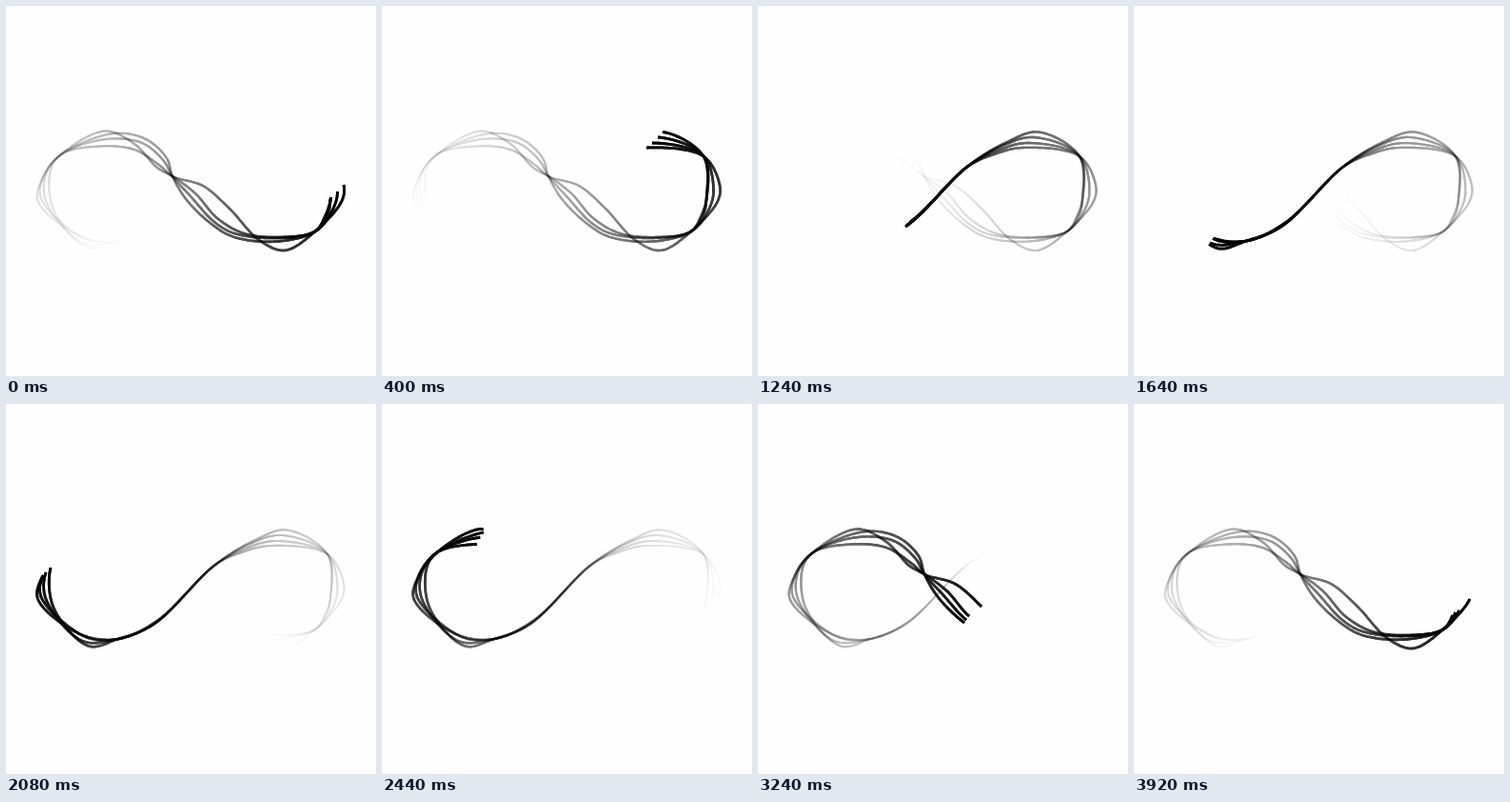
These frames come from a looping animation (389 by 389 pixels, 3960 ms). An HTML page with a canvas:

```html
<!DOCTYPE html>
<html lang="en">
<head>
<meta charset="utf-8">
<title>Infinity strands</title>
<style>
html, body { margin: 0; width: 100%; height: 100%; overflow: hidden; background: #fefefe; }
canvas { display: block; width: 389px; height: 389px; }
</style>
</head>
<body>
<canvas id="stage" width="389" height="389"></canvas>
<script>
const SIZE = 389, LOOP = 3960, TICK = 40, PERIOD = 4000;
const TRAIL = 2600, STEP = 20, GRID = 10;

// Crossings shared by all strands
const RIGHT = [338, 158], DIAG = [220, 169], LOW = [118, 247],
      LEFT = [58, 156], MID = [175, 179], END = [325, 237];

// Points that carry a time, as [index, ms]
const KEYS = [[0, 0], [2, 400], [5, 1240], [9, 2080], [13, 2760], [16, 3240], [20, 3920], [21, PERIOD]];

const STRANDS = [
  [[341, 203], RIGHT, [295, 132.5], [262, 143], DIAG, [155, 232], LOW, [87, 254.5], [50, 214], [47, 172], LEFT,
   [104, 131.5], [135, 145], [159, 170], MID, [199, 197], [222, 223], [250, 239], [290, 243], END, [338, 219]],
  [[341.5, 201], RIGHT, [290, 138], [257, 147], DIAG, [156, 231], LOW, [80, 249], [42, 205], [42, 177], LEFT,
   [113, 134], [147, 140], [169, 160], MID, [190, 204], [217, 230], [240, 243], [285, 247.5], END, [335, 222]],
  [[348.5, 195], RIGHT, [284, 144], [252, 152], DIAG, [157, 230], LOW, [84, 245], [37, 203], [39, 180], LEFT,
   [105, 140], [143, 144], [166, 163], MID, [194, 200], [219, 227], [240, 239], [285, 244], END, [342, 217]],
  [[355, 188], RIGHT, [278, 149], [248, 156], DIAG, [160, 227], LOW, [78, 242], [33.5, 205], [38, 182], LEFT,
   [98, 147.5], [135, 151], [162, 168], MID, [207, 189], [235, 213], [266, 246], [293, 257], END, [353, 205]]
];

const dist = (a, b) => Math.hypot(b[0] - a[0], b[1] - a[1]);
const mix = (a, b, k) => [a[0] + (b[0] - a[0]) * k, a[1] + (b[1] - a[1]) * k];

// Centripetal Catmull-Rom between b and c
function curve(a, b, c, d, k) {
  const t1 = Math.sqrt(dist(a, b)), t2 = t1 + Math.sqrt(dist(b, c)), t3 = t2 + Math.sqrt(dist(c, d));
  const t = t1 + (t2 - t1) * k;
  const p = mix(a, b, t / t1), q = mix(b, c, k), r = mix(c, d, (t - t2) / (t3 - t2));
  return mix(mix(p, q, t / t2), mix(q, r, (t - t1) / (t3 - t1)), k);
}

// Positions every GRID ms, with even speed between timed points
function timeline(pts) {
  const n = pts.length, at = i => pts[(i + n) % n], table = [];
  for (let j = 1; j < KEYS.length; j++) {
    const [i0, t0] = KEYS[j - 1], [i1, t1] = KEYS[j];
    const path = [at(i0)], len = [0];
    for (let i = i0; i < i1; i++) {
      for (let s = 1; s <= 24; s++) {
        const p = curve(at(i - 1), at(i), at(i + 1), at(i + 2), s / 24);
        len.push(len[len.length - 1] + dist(path[path.length - 1], p));
        path.push(p);
      }
    }
    const total = len[len.length - 1];
    for (let t = t0, s = 1; t < t1; t += GRID) {
      const l = total * (t - t0) / (t1 - t0);
      while (len[s] < l) s++;
      table.push(mix(path[s - 1], path[s], (l - len[s - 1]) / (len[s] - len[s - 1])));
    }
  }
  return table;
}

const tables = STRANDS.map(timeline);
const where = (table, t) => table[Math.round(((t + 2 * PERIOD) % PERIOD) / GRID) % table.length];

const ctx = document.getElementById('stage').getContext('2d');
const layer = document.createElement('canvas');
layer.width = layer.height = SIZE;
const pen = layer.getContext('2d');
pen.lineJoin = 'round';

function drawStrand(table, time) {
  pen.fillStyle = '#fff';
  pen.fillRect(0, 0, SIZE, SIZE);
  for (let age = TRAIL; age > 0; age -= STEP) {
    const x = age / TRAIL;
    const gray = Math.round(255 * (1 - Math.pow(1 - x, 1.35)));
    pen.strokeStyle = `rgb(${gray},${gray},${gray})`;
    pen.lineWidth = 2.8 - 1.2 * x;
    pen.beginPath();
    for (let a = age; a >= Math.max(0, age - 2 * STEP); a -= GRID) {
      pen.lineTo(...where(table, time - a));
    }
    pen.stroke();
  }
}

function draw(time) {
  ctx.globalCompositeOperation = 'source-over';
  ctx.fillStyle = '#fefefe';
  ctx.fillRect(0, 0, SIZE, SIZE);
  ctx.globalCompositeOperation = 'multiply';
  for (const table of tables) {
    drawStrand(table, time);
    ctx.drawImage(layer, 0, 0);
  }
}

const start = performance.now();
let last = -1;
function frame() {
  const time = Math.floor(((performance.now() - start) % LOOP) / TICK) * TICK;
  if (time !== last) draw(last = time);
  requestAnimationFrame(frame);
}
frame();
</script>
</body>
</html>
```
